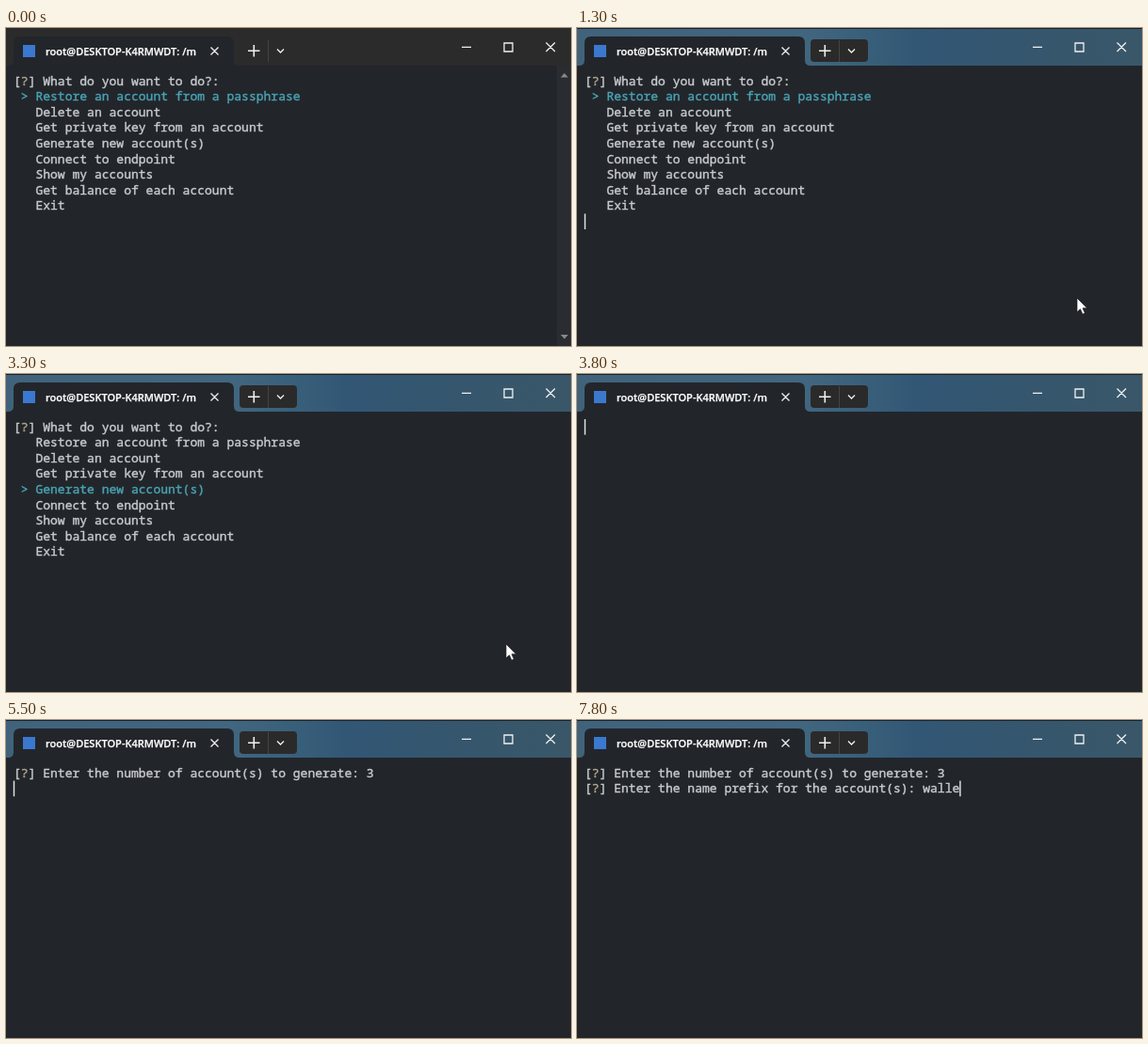
Recreate the animation shown at these times as an HTML page. Size 600 by 338 pixels, loop 8000 ms.

```html
<!DOCTYPE html>
<html lang="en">
<head>
<meta charset="utf-8">
<title>Account menu</title>
<style>
  html, body { margin: 0; width: 100%; height: 100%; overflow: hidden; background: #22262b; }
  svg { display: block; width: 100vw; height: 100vh; }
  .term text { font: 500 13.02px "Noto Sans Mono", "DejaVu Sans Mono", monospace; white-space: pre;
    fill: #c9cbce; stroke: #c9cbce; stroke-width: .4px; }
  .term .pick { fill: #4aa3b3; stroke: #4aa3b3; }
  .term .mark { fill: #b3a68c; stroke: #b3a68c; }
  .title { font: 600 11px "Open Sans", "Noto Sans", sans-serif; fill: #fff; stroke: #fff; stroke-width: .25px; }
  .icon { fill: none; stroke: #f0f0f0; stroke-width: 1.3; }
</style>
</head>
<body>
<svg viewBox="0 0 600 338">
  <defs>
    <linearGradient id="blue">
      <stop offset="0" stop-color="#40637b"/>
      <stop offset=".4" stop-color="#41667f"/>
      <stop offset=".5" stop-color="#39607b"/>
      <stop offset=".6" stop-color="#325775"/>
      <stop offset=".8" stop-color="#35566d"/>
      <stop offset="1" stop-color="#3a5769"/>
    </linearGradient>
    <clipPath id="label"><path d="M40 10H202.500V38H40z"/></clipPath>
  </defs>
  <rect width="600" height="338" fill="#22262b"/>

  <rect width="600" height="40" fill="#2c2b2b"/>
  <g id="focus">
    <rect width="600" height="40" fill="url(#blue)"/>
    <rect width="600" height="1" fill="#1c2329"/>
    <rect x="248" y="12" width="61" height="24" rx="4" fill="#2b2a2a"/>
  </g>
  <path d="M2 40Q8 40 8 34V16Q8 9 15 9H235Q242 9 242 16V34Q242 40 248 40z" fill="#22262b"/>
  <rect x="18" y="18" width="13" height="13" fill="#3b78cf"/>
  <text class="title" x="42" y="29" clip-path="url(#label)">root@DESKTOP-K4RMWDT: /m</text>
  <path d="M278.500 13V36" stroke="#444" fill="none"/>
  <path class="icon" d="M217.500 20.500l8 8m0-8l-8 8M288 22.500l3.500 3.500 3.500-3.500M484 20.300h10M529 16h9v9h-9zM573.500 15.500l9.500 9.500m0-9.500l-9.500 9.500"/>
  <path class="icon" style="stroke-width:1.6" d="M257 24.300h12.500M263.300 18v12.500"/>

  <g id="scroll">
    <rect x="585" y="40" width="15" height="298" fill="#292c30"/>
    <path d="M589 52.500l4-4.500 4 4.500zM589 326l4 4.500 4-4.500z" fill="#87898b"/>
  </g>
  <g id="term" class="term"></g>
  <rect id="cursor" width="1.400" height="16.600" fill="#e8e8e8"/>
  <path id="mouse" d="M531 287v15l3.500-3.200 2.400 5.400 2.500-1.100-2.400-5.300h4.700z" fill="#fff" stroke="#15171a" stroke-width=".7"/>
</svg>
<script>
const LOOP = 8000, X = 8, Y = 48, CHAR = 7.812, ROW = 16.6;
const ITEMS = ["Restore an account from a passphrase", "Delete an account",
  "Get private key from an account", "Generate new account(s)", "Connect to endpoint",
  "Show my accounts", "Get balance of each account", "Exit"];
const COUNT = "Enter the number of account(s) to generate: ";
const PREFIX = "Enter the name prefix for the account(s): ";
const MOVES = [2400, 2600, 2800];
const KEYS = [7100, 7300, 7500, 7600, 7800];
const HIDDEN = [[0, 300], [800, 1300], [1900, 2400], [3300, 3800], [4400, 5000], [6100, 6700]];

const el = id => document.getElementById(id);
const passed = (times, t) => times.filter(at => at <= t).length;
const show = (id, opacity) => el(id).setAttribute("opacity", opacity);
const ask = text => `[<tspan class="mark">?</tspan>] ${text}`;

function menu(t) {
  const picked = passed(MOVES, t);
  const rows = ITEMS.map((item, i) => i === picked
    ? `<tspan class="pick"> &gt; ${item}</tspan>` : `   ${item}`);
  return { lines: [ask("What do you want to do?:"), ...rows], row: 9, col: 0 };
}

function screen(t) {
  if (t < 3800) return menu(t);
  if (t < 3900) return { lines: [], row: 0, col: 0 };
  const count = COUNT + (t < 5100 ? "" : "3");
  if (t < 5500) return { lines: [ask(count)], row: 0, col: 4 + count.length };
  if (t < 5600) return { lines: [ask(count)], row: 1, col: 0 };
  const prefix = PREFIX + "walle".slice(0, passed(KEYS, t));
  return { lines: [ask(count), ask(prefix)], row: 1, col: 4 + prefix.length };
}

let drawn;
function draw(t) {
  const { lines, row, col } = screen(t);
  const html = lines.map((line, i) =>
    `<text xml:space="preserve" x="${X}" y="${Y + 12.5 + i * ROW}">${line}</text>`).join("");
  if (html !== drawn) el("term").innerHTML = drawn = html;

  el("cursor").setAttribute("x", X + col * CHAR - 0.2);
  el("cursor").setAttribute("y", Y + row * ROW);
  show("cursor", HIDDEN.some(([from, to]) => t >= from && t < to) ? 0 : 1);
  show("focus", passed([200, 300], t) / 2);
  show("scroll", 1 - passed([400, 500, 600], t) / 3);
  show("mouse", t >= 400 && t < 3800 ? 1 : 0);
}

const start = performance.now();
function tick() {
  draw((performance.now() - start) % LOOP);
  requestAnimationFrame(tick);
}
tick();
</script>
</body>
</html>
```
